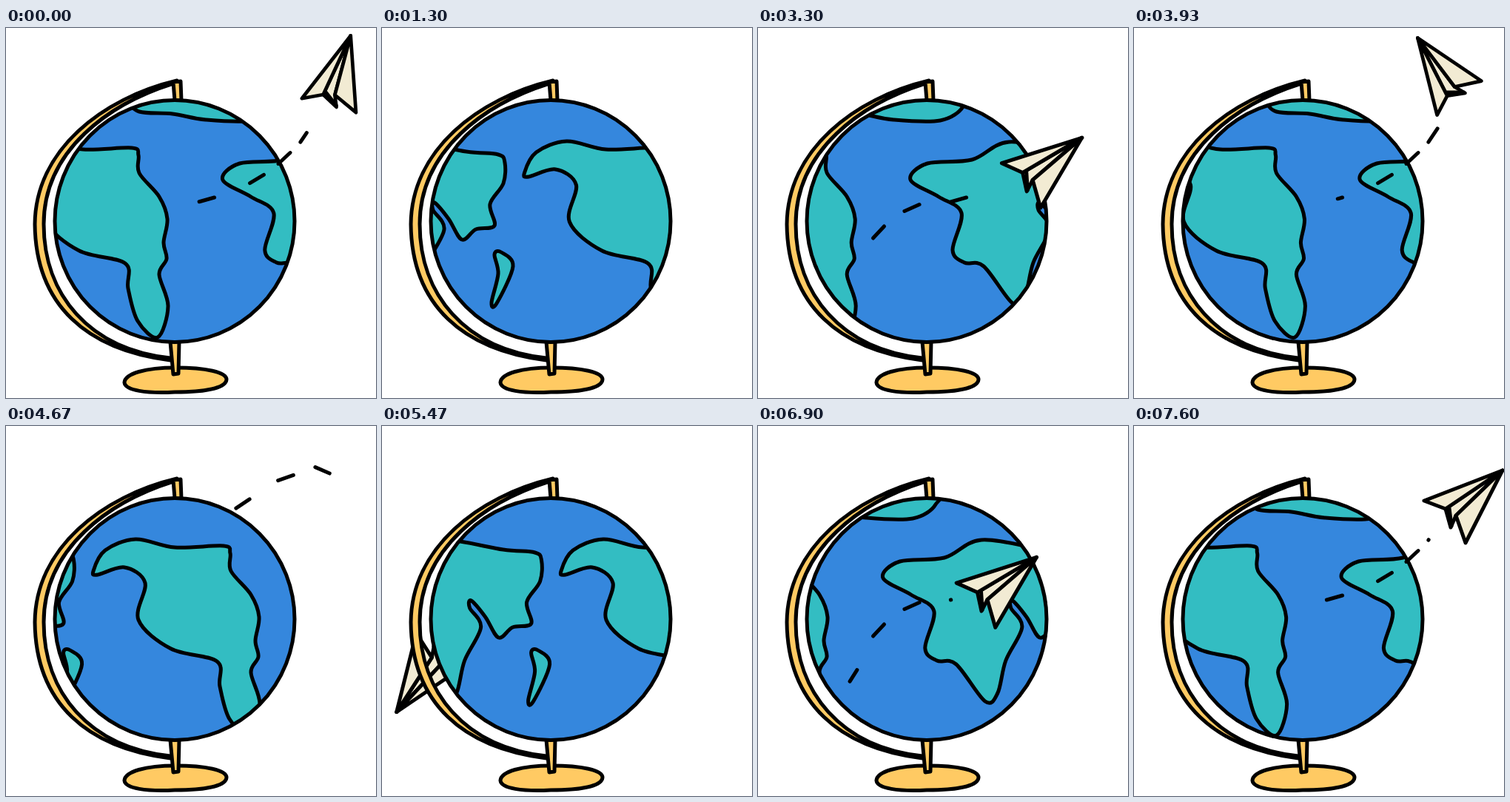
Recreate the animation shown at these times as an HTML page. Size 500 px wide and 500 px high, loop 7.66 s.

```html
<!DOCTYPE html>
<html lang="en">
<head>
<meta charset="utf-8">
<title>Globe and paper plane</title>
<style>
  html, body { margin: 0; width: 100%; height: 100%; overflow: hidden; background: #fff; }
  svg { display: block; width: 100vw; height: 100vh; }
  .ink { stroke: #000; stroke-width: 5; stroke-linecap: round; stroke-linejoin: round; }
  .sea { fill: #3587dd; }
  .land { fill: #33bdc2; }
  .brass { fill: #ffca63; }
  .paper { fill: #f2ebd3; }
  .none { fill: none; }
</style>
</head>
<body>
<svg viewBox="0 0 500 500">
  <defs>
    <clipPath id="disc"><ellipse cx="228" cy="261" rx="162" ry="163.5"/></clipPath>
    <g id="map"></g>
    <g id="plane" class="ink paper">
      <path d="M52-46L-25 6L-18 31L-11 15Z"/>
      <path d="M52-46L-54-5L-25 6Z"/>
      <path d="M52-46L-11 15L2 52Z"/>
      <path class="none" d="M-20 5L-17 29"/>
    </g>
  </defs>
  <use id="planeBehind" href="#plane"/>
  <g class="ink brass">
    <path d="M231 71C130 95 40 165 39 265C40 375 110 435 222 449V446C112 434 51 360 51 265C51 165 140 102 226 75Z"/>
    <path d="M226 73L236 72L237 98L228 98Z"/>
    <path d="M160 479C161 467 188 459 229 459C270 459 298 465 298 475C297 487 268 492 228 492C190 494 161 490 160 479Z"/>
    <path d="M222 424L234 424L233 467L226 468Z"/>
  </g>
  <ellipse class="sea" cx="228" cy="261" rx="162" ry="163.5"/>
  <g clip-path="url(#disc)"><g id="scroll"><use href="#map"/><use href="#map" x="-595.2"/></g></g>
  <ellipse class="ink none" cx="228" cy="261" rx="162" ry="163.5"/>
  <g id="trail" class="ink none"></g>
  <use id="planeFront" href="#plane"/>
</svg>
<script>
const $ = id => document.getElementById(id);
const LOOP = 7660, CYCLE = 48, STEP = 12.4, WIDTH = CYCLE * STEP;
const clamp = v => Math.max(0, Math.min(1, v));
const pairs = text => text.trim().split(/\s+/).map(p => p.split(',').map(Number));

function add(parent, attrs) {
  const path = document.createElementNS('http://www.w3.org/2000/svg', 'path');
  for (const name in attrs) path.setAttribute(name, attrs[name]);
  return parent.appendChild(path);
}

// Closed Catmull-Rom curve through the points, as cubic segments
function smooth(points) {
  const at = i => points[(i + points.length) % points.length];
  const segments = points.map((b, i) => {
    const [a, c, e] = [at(i - 1), at(i + 1), at(i + 2)];
    const p = b.map((v, j) => v + (c[j] - a[j]) / 6);
    const q = c.map((v, j) => v - (e[j] - b[j]) / 6);
    return `C${p} ${q} ${c}`;
  });
  return `M${points[0]}${segments.join('')}Z`;
}

function land(dx, outline) {
  const points = pairs(outline).map(([x, y]) => [x + dx, y]);
  add($('map'), { class: 'ink land', d: smooth(points) });
}

// Americas, Eurasia with Africa, the island and the Arctic
land(-124, `118,196 134,168 175,153 228,164 294,162 303,172 304,196 331,228 342,258 337,290
  341,312 331,333 343,376 329,418 302,396 289,352 285,318 223,301 179,262 188,212 160,191 124,201`);
land(210.8, `82,205 105,183 165,178 215,154 300,167 343,171 352,182 350,210 332,238 338,267 313,272
  294,286 276,258 257,236 255,246 270,272 248,317 237,361 220,372 181,322 155,317 139,300 151,250 120,228`);
land(210.8, `338,306 347,303 363,322 341,372 334,371 343,332`);
land(0, `166,97 180,113 225,116 270,124 333,125 364,106 360,80 170,80`);

// Each inner knot of the trail carries one dash; the ends only give direction
const knots = pairs(`0,360 30,408 85,399 128,339 163,276 208,243 271,232 339,204 376,176
  404,145 428,60 378,70 320,105 285,130`);

function pull([ax, ay], [bx, by]) {
  const [dx, dy] = [bx - ax, by - ay];
  const weight = dx * dx + dy * dy;
  return [dx / weight, dy / weight];
}

const dashes = knots.slice(1, -1).map(([x, y], i) => {
  const before = pull(knots[i], [x, y]), after = pull([x, y], knots[i + 2]);
  const angle = Math.atan2(before[1] + after[1], before[0] + after[0]);
  const [dx, dy] = [11 * Math.cos(angle), 11 * Math.sin(angle)];
  const born = 21.75 + 3.4 * i - 0.031 * i * i;
  return {
    born,
    dies: born + 8.1 + 1.9 * Math.sin(Math.PI * i / 9),
    path: add($('trail'), { d: `M${x - dx} ${y - dy}L${x + dx} ${y + dy}`, pathLength: 1 })
  };
});

function drawDash({ path, born, dies }, phase) {
  const step = phase < born ? phase + CYCLE : phase;
  const head = clamp((step - born) / 1.5), tail = clamp((step - dies) / 1.5);
  path.style.display = head > tail ? '' : 'none';
  path.setAttribute('stroke-dasharray', `${head - tail} 2`);
  path.setAttribute('stroke-dashoffset', -tail);
}

// step, x, y, rotation
const flight = [
  [0, 446, 73, -31], [2, 395, 62, -135], [5, 305, 120, -170], [20, 60, 330, -193],
  [22, 42, 368, -236], [24, 65, 405, -300], [30, 161, 309, -361],
  [31, 179, 288.5, -357], [41, 383, 191, -356.5], [47, 446, 106, -360]
];
const [, homeX, homeY, homeTurn] = flight[0];
flight.push([CYCLE, homeX, homeY, homeTurn - 360]);

function planeAt(phase) {
  const i = flight.findIndex(key => key[0] > phase);
  const a = flight[i - 1], b = flight[i];
  const f = (phase - a[0]) / (b[0] - a[0]);
  return a.map((v, j) => v + (b[j] - v) * f).slice(1);
}

function drawPlane(phase) {
  const [x, y, turn] = planeAt(phase);
  const scale = phase < 20 ? 0.945 : 1;
  const behind = phase >= 2 && phase < 22;
  for (const [id, shown] of [['planeBehind', behind], ['planeFront', !behind]]) {
    $(id).style.display = shown ? '' : 'none';
    $(id).setAttribute('transform', `translate(${x} ${y}) rotate(${turn}) scale(${scale})`);
  }
}

// Five uneven holds fill every 400 ms
function stepAt(time) {
  const rest = time % 400;
  return 5 * Math.floor(time / 400) + [100, 170, 270, 330].filter(t => t <= rest).length;
}

function draw(time) {
  const step = stepAt(time % LOOP), phase = step % CYCLE;
  $('scroll').setAttribute('transform', `translate(${phase * STEP} 0)`);
  dashes.forEach(dash => drawDash(dash, phase));
  drawPlane(phase);
}

const start = performance.now();
function tick() {
  draw(performance.now() - start);
  requestAnimationFrame(tick);
}
tick();
</script>
</body>
</html>
```
